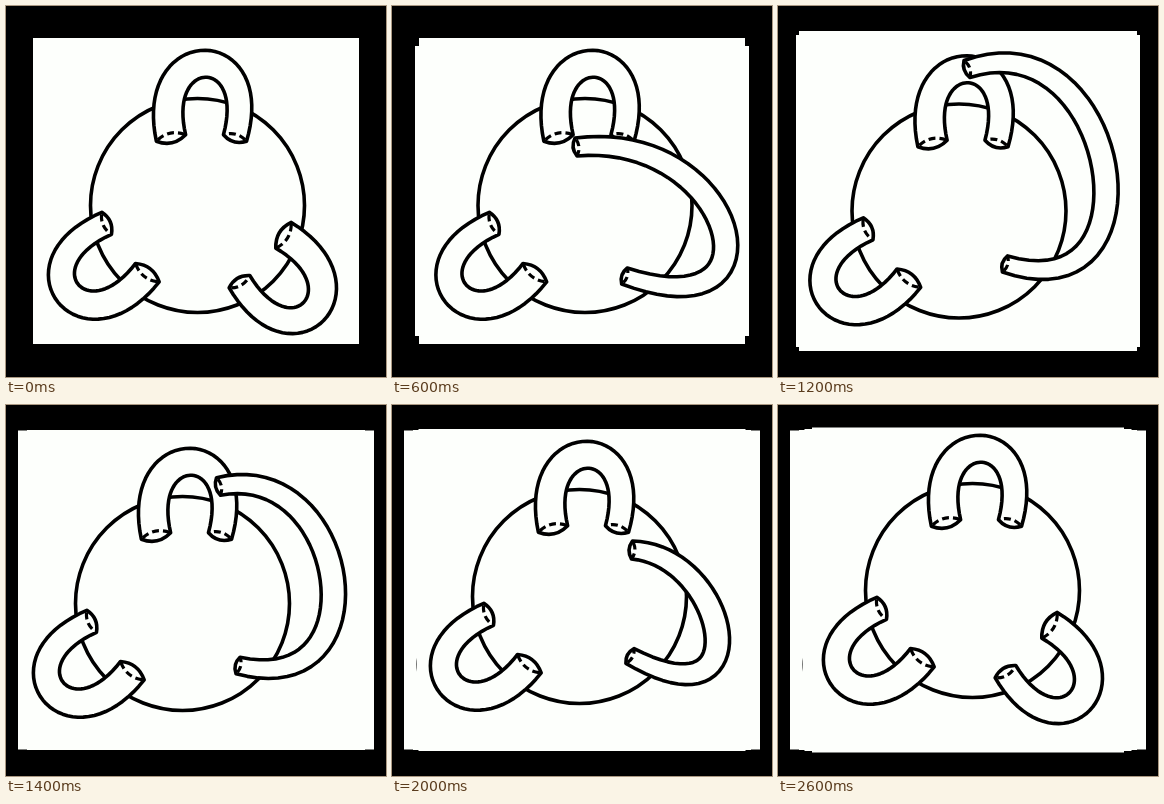
These frames come from a looping animation (380x371 px, 2800 ms). An HTML page with a canvas:

```html
<!DOCTYPE html>
<html lang="en">
<head>
<meta charset="utf-8">
<title>Sliding handle</title>
<style>
  html, body { margin: 0; width: 100%; height: 100%; overflow: hidden; background: #000; }
  canvas { display: block; }
</style>
</head>
<body>
<canvas id="stage" width="380" height="371"></canvas>
<script>
const ctx = document.getElementById('stage').getContext('2d');
const PAPER = '#fdfffc';
const STEP = 200;
const COUNT = 14;
const RADIUS = 107;
const LINE = 3.6;

const points = text => text.split(' ').map(pair => pair.split(',').map(Number));
const lerp = (a, b, k) => a + (b - a) * k;

// A tube is a cubic Bezier centre line; slack 0 is a stiff horseshoe, 1 a stretched hose
const hose = text => ({ path: points(text), slack: 1 });

function horseshoe(x, y, degrees) {
  const a = degrees * Math.PI / 180, c = Math.cos(a), s = Math.sin(a);
  const path = points('-32,0 -54,-99 60,-99 32,0')
    .map(([px, py]) => [x + px * c - py * s, y + px * s + py * c]);
  return { path, slack: 0 };
}

const fixedHandles = [horseshoe(197, 132, 0), horseshoe(121, 242, -129.5)];

// Moving foot, two controls, planted foot
const stations = [
  horseshoe(255.5, 252.5, 133.5),
  hose('206,185 340,185 390,328 237,272'),
  hose('162,97 345,62 410,330 228,268'),
  hose('189,63 340,10 390,310 227,258'),
  hose('236,100 345,95 369,283 237,263'),
  hose('240,145 335,150 372,325 238,251'),
  horseshoe(249.5, 243.5, 133.5)
];

// Unsteady placement of the body, one offset per step
const drift = points('0,0 3,3 6,6 1.5,0 -3.5,4 -7,5 -10.5,5.5 -15,-1 1,-1 0,5 -4,-8 -7,-4 -2,-4 3,-14');

// Paper grows from its centre: first step, half width, half height
const sheets = [
  [0, 163, 153], [2, 167, 145], [4, 172, 156], [6, 169, 160],
  [7, 178, 159.5], [10, 163.5, 161], [13, 156, 162.5]
];

// Two steps per station, then the foot eases back home
function stationAt(step) {
  if (step <= 10) return step / 2;
  const left = (COUNT - 1 - step) / 3;
  return 6 - left * left;
}

function slidingHandle(step) {
  const at = stationAt(step), i = Math.min(Math.floor(at), stations.length - 2), k = at - i;
  const a = stations[i], b = stations[i + 1];
  return {
    path: a.path.map(([x, y], n) => [lerp(x, b.path[n][0], k), lerp(y, b.path[n][1], k)]),
    slack: lerp(a.slack, b.slack, k)
  };
}

// Both edges and the direction of a tube at t
function slice({ path: [p, q, r, s], slack }, t) {
  const u = 1 - t;
  const at = n => u * u * u * p[n] + 3 * u * u * t * q[n] + 3 * u * t * t * r[n] + t * t * t * s[n];
  const slope = n => u * u * (q[n] - p[n]) + 2 * u * t * (r[n] - q[n]) + t * t * (s[n] - r[n]);
  const x = at(0), y = at(1), dx = slope(0), dy = slope(1), len = Math.hypot(dx, dy);
  const w = lerp(15 - 3 * t, 9 - t / 2 + 3.5 * Math.sin(Math.PI * t), slack);
  const tx = dx / len, ty = dy / len;
  return { x, y, tx, ty, w, outer: [x + ty * w, y - tx * w], inner: [x - ty * w, y + tx * w] };
}

// Half of the round mouth; side is -1 or 1 along the tube
function rim(cut, side, end) {
  const reach = cut.w * .65 * side;
  ctx.quadraticCurveTo(cut.x + cut.tx * reach, cut.y + cut.ty * reach, ...end);
}

function stroke(width) {
  ctx.lineWidth = width;
  ctx.stroke();
}

function hiddenRim(cut, side) {
  ctx.beginPath();
  ctx.moveTo(...cut.outer);
  rim(cut, side, cut.inner);
  ctx.setLineDash([7, 4]);
  ctx.lineDashOffset = -2;
  stroke(3.2);
  ctx.setLineDash([]);
}

function drawTube(tube) {
  const cuts = Array.from({ length: 41 }, (_, i) => slice(tube, i / 40));
  const first = cuts[0], last = cuts[40];
  ctx.beginPath();
  for (const cut of cuts) ctx.lineTo(...cut.outer);
  rim(last, 1, last.inner);
  for (const cut of cuts.reverse()) ctx.lineTo(...cut.inner);
  rim(first, -1, first.outer);
  ctx.closePath();
  ctx.fillStyle = PAPER;
  ctx.fill();
  stroke(LINE);
  hiddenRim(first, 1);
  hiddenRim(last, -1);
}

// Stray pen mark at the left margin, soon mostly wiped away
function drawMark(step) {
  if (step < 8) return;
  ctx.save();
  ctx.beginPath();
  ctx.rect(23, 240, step === 8 ? 4 : 2, 40);
  ctx.clip();
  ctx.beginPath();
  ctx.moveTo(28, 247);
  ctx.quadraticCurveTo(23.5, 259, 28.5, 276);
  stroke(2.8);
  ctx.restore();
}

function draw(step) {
  ctx.fillStyle = '#000';
  ctx.fillRect(0, 0, 380, 371);
  ctx.fillStyle = PAPER;
  for (const [from, w, h] of sheets) {
    if (step >= from) ctx.fillRect(190 - w, 185 - h, 2 * w, 2 * h);
  }
  ctx.strokeStyle = '#000';
  ctx.lineJoin = 'round';
  drawMark(step);

  ctx.save();
  ctx.translate(...drift[step]);
  ctx.beginPath();
  ctx.arc(191.5, 199.5, RADIUS, 0, Math.PI * 2);
  stroke(LINE);
  fixedHandles.forEach(drawTube);
  ctx.restore();

  drawTube(slidingHandle(step));
}

const start = performance.now();
function tick() {
  const elapsed = Math.max(0, performance.now() - start);
  draw(Math.floor(elapsed / STEP) % COUNT);
  requestAnimationFrame(tick);
}
tick();
</script>
</body>
</html>
```
